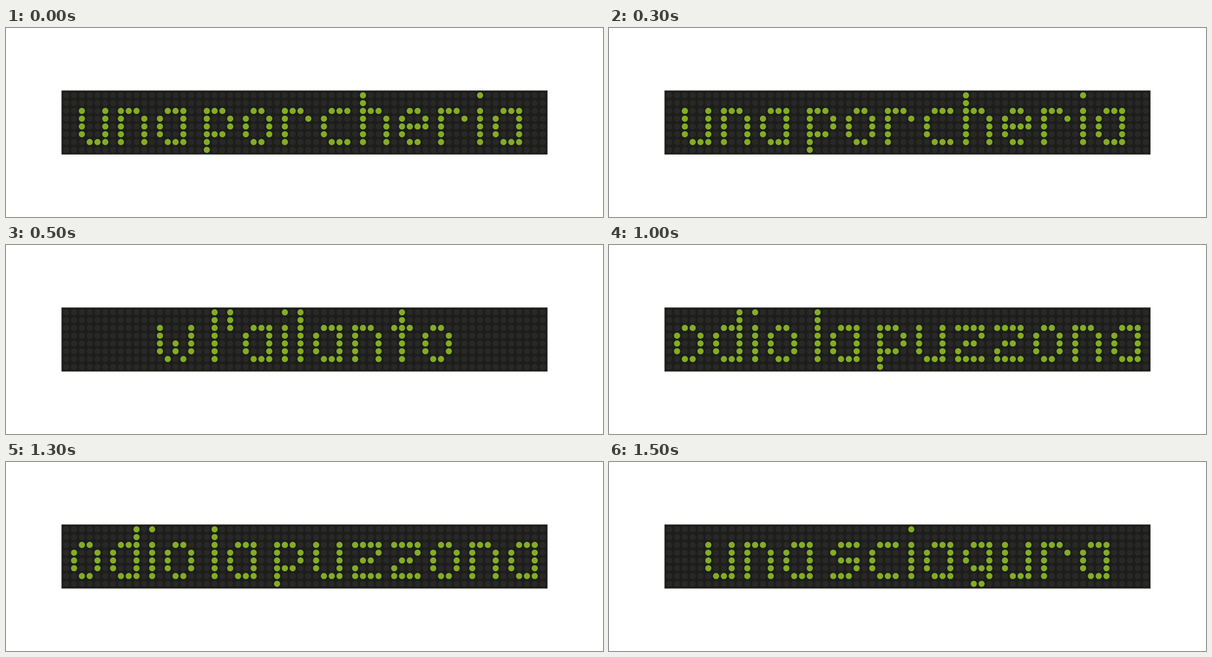
Write an HTML page that moves like this. It is 1080 px wide and 343 px high and loops after 2000 ms.

```html
<!DOCTYPE html>
<html lang="it">
<head>
<meta charset="utf-8">
<title>LED sign</title>
<style>
  html, body { margin: 0; width: 100%; height: 100%; overflow: hidden; background: #fff; }
  svg { display: block; width: 100%; height: 100%; }
</style>
</head>
<body>
<svg viewBox="0 0 1080 343">
  <rect x="100.4" y="113.4" width="879.2" height="116.2" fill="#1d1d1b"/>
  <path id="unlit" fill="#282827"/>
  <path id="lit" fill="#83ad25"/>
</svg>
<script>
const COLS = 62, ROWS = 8, PITCH = 14.125, X0 = 109, Y0 = 122.2, RADIUS = 5.6;
const STEP = 500;

// Rows run from the ascender at the top to the descender at the bottom.
const GLYPHS = {
  a: '.... .... .XXX X..X X..X X..X .XXX',
  c: '.... .... .XXX X... X... X... .XXX',
  d: '...X ...X .XXX X..X X..X X..X .XXX',
  e: '.... .... .XX. X..X XXXX X... .XX.',
  g: '.... .... .XXX X..X X..X .XXX ...X .XX.',
  h: 'X... X... XXX. X..X X..X X..X X..X',
  i: 'X . X X X X X',
  l: 'X X X X X X X',
  n: '.... .... XXX. X..X X..X X..X X..X',
  o: '.... .... .XX. X..X X..X X..X .XX.',
  p: '.... .... XXX. X..X X..X XXX. X... X...',
  r: '.... .... XXX. X..X X... X... X...',
  s: '.... .... .XXX X... .XXX ...X XXX.',
  t: '.X. .X. XXX .X. .X. .X. .X.',
  u: '.... .... X..X X..X X..X X..X .XXX',
  w: '..... ..... X...X X...X X.X.X X.X.X .X.X.',
  z: '.... .... XXXX ...X .XX. X... XXXX',
  "'": 'X X X'
};

const MESSAGES = [
  { text: 'una porcheria', col: 2 },
  { text: "w l'ailanto", col: 12 },
  { text: 'odio la puzzona', col: 1 },
  { text: 'una sciagura', col: 5 }
];

function dot(col, row) {
  const x = X0 + col * PITCH - RADIUS, y = Y0 + row * PITCH, d = 2 * RADIUS;
  return `M${x} ${y}a${RADIUS} ${RADIUS} 0 1 1 ${d} 0a${RADIUS} ${RADIUS} 0 1 1 ${-d} 0z`;
}

function messagePath({ text, col }) {
  let path = '';
  for (const char of text) {
    if (char === ' ') { col++; continue; }
    const rows = GLYPHS[char].split(' ');
    rows.forEach((line, row) => {
      [...line].forEach((cell, i) => { if (cell === 'X') path += dot(col + i, row); });
    });
    col += rows[0].length + 1;
  }
  return path;
}

function gridPath() {
  let path = '';
  for (let row = 0; row < ROWS; row++)
    for (let col = 0; col < COLS; col++) path += dot(col, row);
  return path;
}

const paths = MESSAGES.map(messagePath);
const lit = document.getElementById('lit');
document.getElementById('unlit').setAttribute('d', gridPath());

let shown = -1;
function draw(time) {
  const index = Math.floor(time / STEP) % paths.length;
  if (index === shown) return;
  shown = index;
  lit.setAttribute('d', paths[index]);
}

const start = performance.now();
function tick() {
  draw(performance.now() - start);
  requestAnimationFrame(tick);
}
tick();
</script>
</body>
</html>
```
